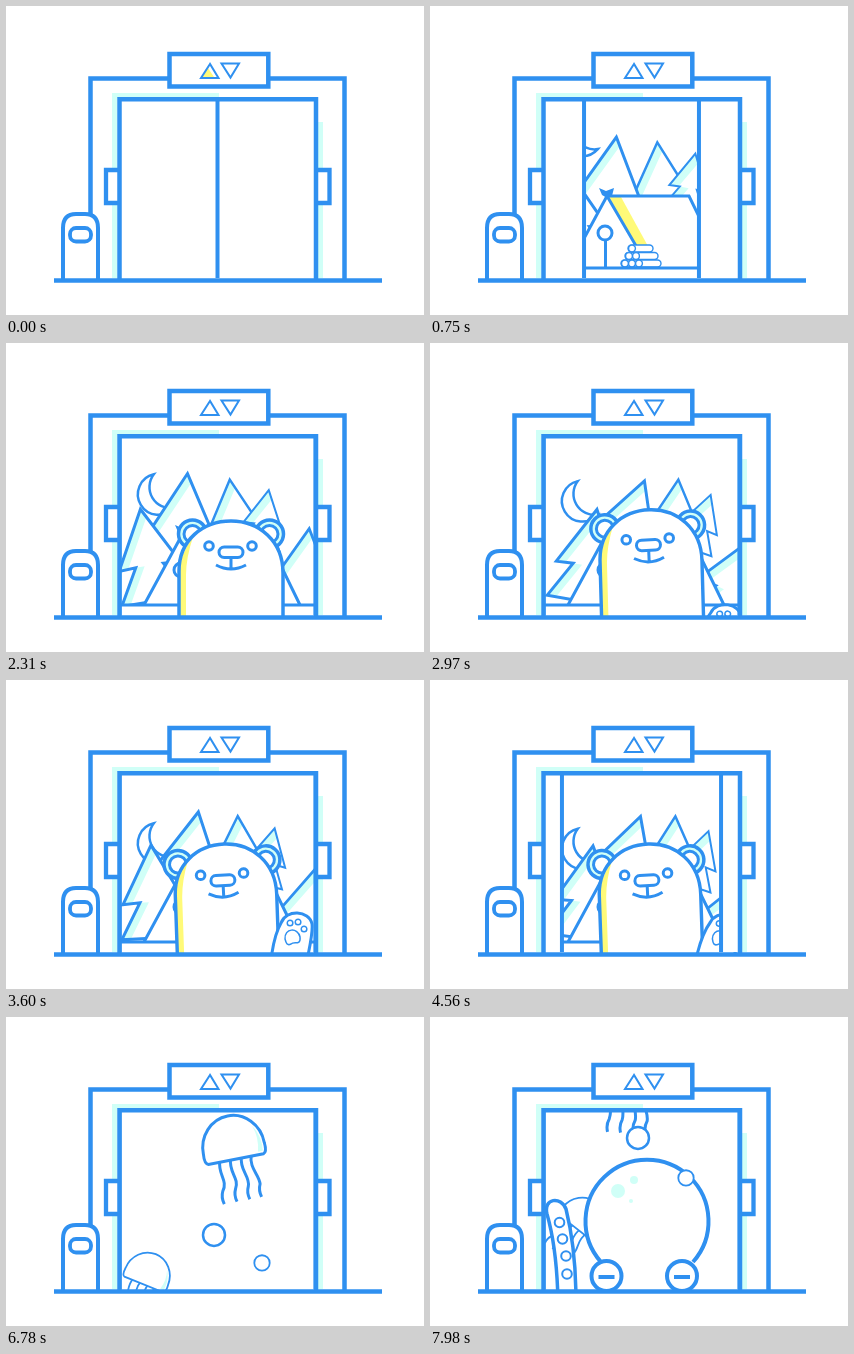
An HTML page with a canvas that plays this animation: 418 by 309 pixels, repeating every 8000 ms.

```html
<!DOCTYPE html>
<html lang="en">
<head>
<meta charset="utf-8">
<title>Elevator</title>
<style>
html, body { margin: 0; width: 100%; height: 100%; overflow: hidden; background: #fff; }
canvas { display: block; }
</style>
</head>
<body>
<canvas id="stage" width="418" height="309"></canvas>
<script>
const ctx = document.getElementById('stage').getContext('2d');
const BLUE = '#2f90f0', CYAN = '#d0fff7', YELLOW = '#fffa78', WHITE = '#fff';
const LOOP = 8000;

const clamp = v => Math.max(0, Math.min(1, v));
const progress = (t, from, to) => clamp((t - from) / (to - from));
const smooth = p => p * p * (3 - 2 * p);
const easeOut = p => 1 - (1 - p) ** 3;
const mix = (a, b, p) => a + (b - a) * p;

function shape(d, width = 4.5, fill = null, color = BLUE) {
  const path = new Path2D(d);
  if (fill) { ctx.fillStyle = fill; ctx.fill(path); }
  if (width) { ctx.lineWidth = width; ctx.strokeStyle = color; ctx.stroke(path); }
}
function circle(x, y, r, width = 3, fill = WHITE) {
  shape(`M${x - r} ${y}a${r} ${r} 0 1 1 ${2 * r} 0a${r} ${r} 0 1 1 ${-2 * r} 0Z`, width, fill);
}
function pill(x, y, w, h, r, width, fill = WHITE) {
  const path = new Path2D();
  path.roundRect(x, y, w, h, r);
  ctx.fillStyle = fill;
  ctx.fill(path);
  ctx.lineWidth = width;
  ctx.strokeStyle = BLUE;
  ctx.stroke(path);
}
function at(x, y, degrees, scale, draw) {
  ctx.save();
  ctx.translate(x, y);
  ctx.rotate(degrees * Math.PI / 180);
  ctx.scale(scale, scale);
  draw();
  ctx.restore();
}
function clipped(x, y, w, h, draw) {
  ctx.save();
  ctx.beginPath();
  ctx.rect(x, y, w, h);
  ctx.clip();
  draw();
  ctx.restore();
}

// Forest

// The tree swings about a root that lies `reach` below its tip.
function tree(x, reach, scale, angle, width) {
  const band = 9 / scale;
  at(x, 262, angle, 1, () => at(0, -reach, 0, scale, () => {
    const outline = 'M0 0L31 58L14 57L34 93H-34L-14 57L-31 58Z';
    shape(outline, 0, WHITE);
    shape(`M0 0L-31 58h${band}L${band / 2} ${band}ZM-14 57L-34 93h${band}L${band - 14} 57Z`, 0, CYAN);
    shape(outline, width / scale);
  }));
}

function tent() {
  shape('M138 262L177 190H259L294 262Z', 0, WHITE);
  shape('M178 191H191L219 242L208 244Z', 0, YELLOW);
  shape('M138 262L177 190H259L294 262M177 190L209 245', 3);
  shape('M169 182L176 185L184 182L182 190L177 192L172 189Z', 0, BLUE);
  shape('M175.5 235V262', 3);
  circle(175, 227, 7, 3);
  [[198, 239, 25], [195, 246.5, 33], [191, 254, 40]].forEach(([x, y, w], row) => {
    pill(x, y, w, 7, 3.5, 1.4);
    for (let i = 0; i <= row; i++) circle(x + 4 + i * 7, y + 3.5, 3.4, 1.4);
  });
}

function paw(t) {
  const up = easeOut(progress(t, 2850, 3300));
  if (!up) return;
  at(282, 290 + 70 * (1 - up), 7 * Math.sin((t - 3600) / 130), 1, () => {
    shape('M-17 -10Q-14 -35 -7 -47C-2 -61 21 -60 24 -46Q25 -38 19 -10Z', 3, WHITE);
    shape('M-3 -31C-4 -42 10 -43 12 -33C13 -24 6 -29 3 -26C-1 -24 -2 -27 -3 -31Z', 1.5, WHITE);
    [[2, -47], [10, -48], [16, -41]].forEach(([x, y]) => circle(x, y, 2.8, 1.5));
  });
}

// Greeting stretches the body while the head tilts and the face slides down.
function bear(t) {
  const rise = 125 * (1 - easeOut(progress(t, 1750, 2310)));
  const greet = smooth(progress(t, 2400, 3200));
  at(225 - 3.5 * greet, 272 + rise - 14 * greet, -2 * greet, 1, () => {
    const head = draw => at(-1.5 * greet, 5 * greet, -greet, 1, draw);
    head(() => {
      for (const side of [-1, 1]) {
        const x = side * (38.5 + 5.5 * greet);
        circle(x, -81, 14, 3.5, CYAN);
        circle(x, -81, 8.5, 3);
      }
    });
    ctx.save();
    ctx.scale(1 - .025 * greet, 1);
    const body = 'M-52 25V-44C-52 -75 -28 -94 0 -94S52 -74 52 -42V25';
    shape(body, 0, WHITE);
    shape('M-52 25V-40Q-51 -62 -38 -78Q-45 -57 -45 -40V25Z', 0, YELLOW);
    shape(body, 3.5);
    ctx.restore();
    head(() => {
      circle(-22, -69, 4.3, 3);
      circle(21, -69, 4.3, 3);
      pill(-12, -68, 24, 10.5, 5.2, 3);
      shape('M0 -57V-47M-15 -50Q0 -42 15 -50', 3);
    });
  });
  paw(t);
}

function forest(t) {
  const u = (t - 1380) / 1000;
  const sway = 4.2 + 10.3 * Math.cos(u * 2 * Math.PI / 1.7);
  at(-1.2, .8 + 14.4 * u - 1.62 * u * u, 0, 1, () =>
    shape('M149 118.5A20.5 20.5 0 1 0 169 152A21 21 0 0 1 149 118.5Z', 2.5));
  clipped(113, 93, 197, 169, () => {
    tree(236, 126, .95, -2.3 + .58 * sway, 2.5);
    tree(242, 116.7, .62, 12.9 + .47 * sway, 2);
    tree(293.6, 77, 1.1, 12.5 + .95 * sway, 2.8);
    tree(169.5, 132, 1.37, 9.5 + .76 * sway, 3);
    tree(150, 97, 1, -3.6 + sway, 3);
  });
  tent();
  shape('M114 262H310', 3);
  bear(t);
}

// Sea

function jellyfish(x, y, angle, scale, width, t) {
  at(x, y, angle, scale, () => {
    [-16, -5, 6, 16].forEach((root, i) => {
      const drift = 3 * Math.sin(t / 260 + i * .5);
      const tip = root - 4 + i * 2;
      shape(`M${root} 3C${root - 5} 17 ${root + 2 + drift} 24 ${tip + 1} 34Q${tip - 2} 40 ${tip} 47`, width);
    });
    const bell = 'M-28 5Q-32 4 -31 -6A31 33 0 0 1 31 -6Q32 4 28 5Z';
    shape(bell, 0, WHITE);
    shape('M22 -25Q30 -13 28 2H23Q27 -12 22 -25Z', 0, CYAN);
    shape(bell, width);
  });
}

function octopus(t) {
  const arm = 110 * (1 - easeOut(progress(t, 7450, 7980)));
  const drop = 145 * (1 - easeOut(progress(t, 7250, 7980)));
  at(0, arm, 0, 1, () => {
    shape('M128 285Q127 232 117 197C113 181 131 179 136 192Q146 232 146 285', 3.5, WHITE);
    [[129.5, 205.5], [132.5, 222], [136, 239], [137, 257]].forEach(([x, y]) => circle(x, y, 4.8, 2));
  });
  at(0, drop, 0, 1, () => {
    const body = 'M171 245A61.5 61.5 0 1 1 263 245';
    shape(body + 'V285H171Z', 0, WHITE);
    shape(body, 4);
    circle(188, 174, 7, 0, CYAN);
    circle(204, 163, 4, 0, CYAN);
    circle(201, 184, 2, 0, CYAN);
    for (const x of [176.5, 252]) {
      circle(x, 259, 15, 4);
      shape(`M${x - 8} 260h16`, 4);
    }
  });
}

function sea(t) {
  const p = (t - 6780) / 1200;
  const bigY = 50 + 267 * Math.exp(-1.27 * (t - 5900) / 1000);
  jellyfish(mix(229, 200, p), bigY, mix(-11, 3, p), 1, 3, t);
  jellyfish(mix(139, 148, p), mix(264, 208, p), mix(22, 38, p), .74, 2.4, t + 300);
  octopus(t);
  circle(208, mix(218, 121, p), 11, 2.5);
  circle(256, mix(246, 161, p), 7.7, 1.8);
}

// Elevator

function surroundings(lit) {
  shape('M106 87H213V92H111V272H106ZM312 116H317V272H312Z', 0, CYAN);
  shape('M84.5 215V72.5H338.5V274');
  shape('M163.5 48H262.3V80.5H163.5Z', 4.5, WHITE);
  if (lit) shape('M202 62L208 71H196Z', 0, YELLOW);
  shape('M204 58L195 72H212.5ZM215.5 57.5H233L224.5 71.5Z', 2);
  shape('M113 164H100V197H113M311 164H323.5V197H311', 4.3, WHITE);
  shape('M57 274V222Q57 208 70 208H79Q92 208 92 222V274', 4, WHITE);
  pill(64, 222, 21, 13.5, 6, 3.8);
}

function doors(gap) {
  const left = 211.5 - gap, right = 211.5 + gap;
  shape(`M113 93H${left}V272H113ZM${right} 93H310V272H${right}Z`, 0, WHITE);
  shape(`M${left} 93V272M${right} 93V272`, 4);
}

function draw(t) {
  ctx.fillStyle = WHITE;
  ctx.fillRect(0, 0, 418, 309);
  surroundings(t < 400 || (t > 4800 && t < 5400));

  const open = smooth(progress(t, 500, 950)) - smooth(progress(t, 4450, 4850))
    + smooth(progress(t, 5500, 5950));
  clipped(113.5, 93, 196.5, 180, () => {
    shape('M113 93H310V273H113Z', 0, WHITE);
    if (open > 0) (t < 5200 ? forest : sea)(t);
    doors(98 * open);
  });

  shape('M113.5 274V93.3H310V274');
  shape('M48 274.5H376');
}

function tick() {
  draw(performance.now() % LOOP);
  requestAnimationFrame(tick);
}
tick();
</script>
</body>
</html>
```
